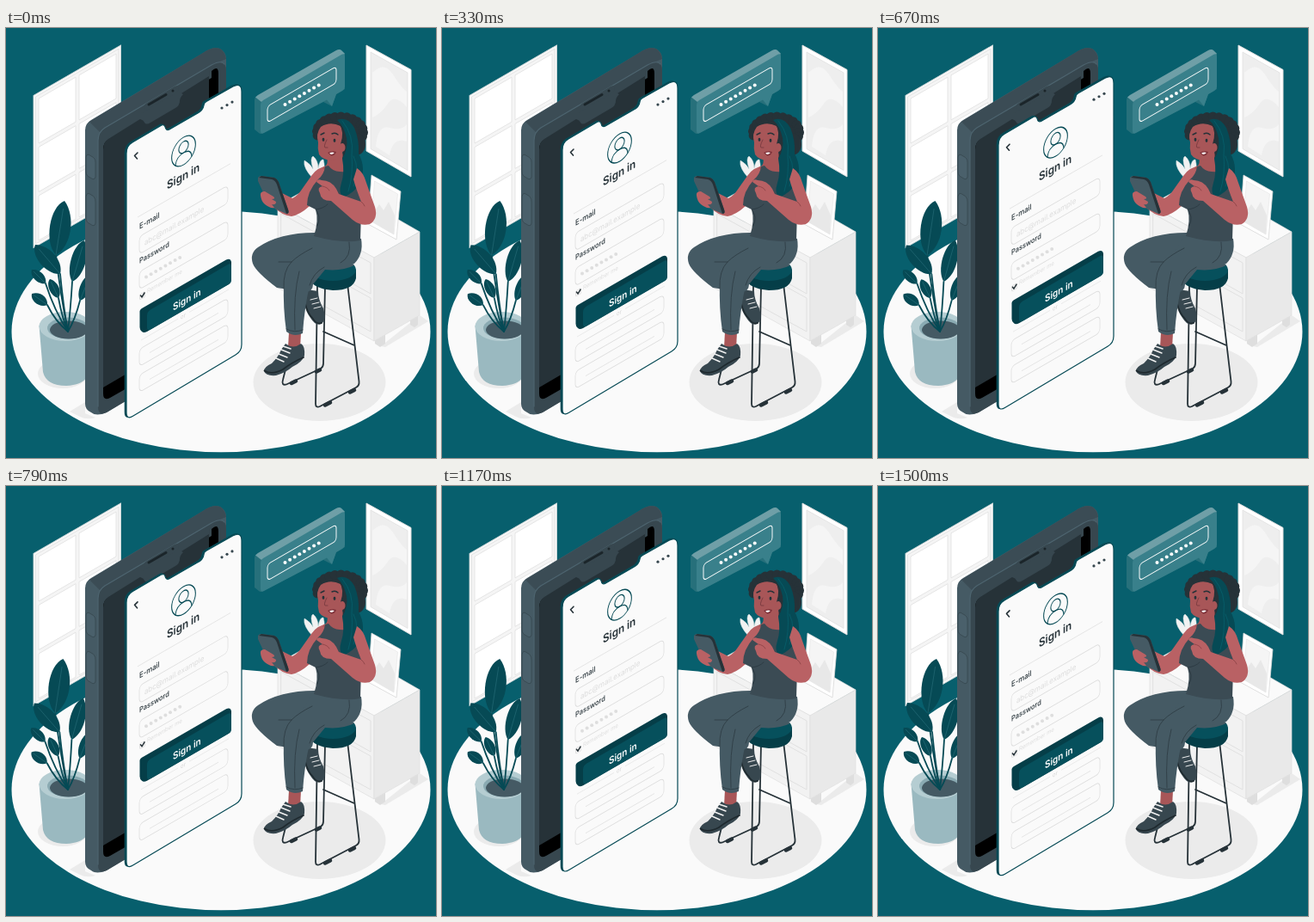
An HTML page that plays this animation: 500 by 500 pixels, repeating every 1.54 s.

```html
<!DOCTYPE html>
<html lang="en">
<head>
<meta charset="utf-8">
<title>Sign in</title>
<style>
html, body { margin: 0; width: 100%; height: 100%; overflow: hidden; background: #075f6d; }
svg { display: block; width: 100vw; height: 100vh; }
text { font-family: Inter, "Liberation Sans", sans-serif; }
.line { fill: none; stroke-linecap: round; stroke-linejoin: round; }
</style>
</head>
<body>
<svg viewBox="0 0 500 500">
  <rect width="500" height="500" fill="#075f6d"/>
  <ellipse cx="250" cy="353" rx="243.500" ry="140.300" fill="#fafafa"/>
  <g fill="#ebebeb">
    <ellipse cx="364.500" cy="412" rx="77" ry="45"/>
    <ellipse cx="66" cy="402" rx="29" ry="17"/>
    <path d="M74 446L92 435V448L104 453Q94 456 86 452Z"/>
    <path d="M436 370L481 334L491 341L441 371Z"/>
  </g>

  <g id="window"></g>

  <g id="wall-art">
    <path d="M419 20L471 48.500V173L419 143Z" fill="#fff" stroke="#dcdcdc"/>
    <path d="M424 28L467 52V165.500L424 140.500Z" fill="#eee" stroke="#e0e0e0" stroke-width=".8"/>
    <path d="M426 52Q440 38 450 54T466 74V92Q452 76 444 88T426 104ZM430 138Q432 112 446 116T466 112V132Q450 126 446 148Z" fill="#f5f5f5"/>
  </g>

  <g id="cabinet" stroke-linejoin="round">
    <path d="M429 352V367L435 371L441 367V350ZM470 336V345L475 348L479 345V333Z" fill="#dedede"/>
    <path d="M316 206L373 175L481 237L428 267Z" fill="#fafafa" stroke="#e0e0e0" stroke-width=".7"/>
    <path d="M316 206L428 267V364L316 302Z" fill="#f2f2f2" stroke="#dedede" stroke-width=".7"/>
    <path d="M428 267L481 237V334L428 364Z" fill="#e9e9e9" stroke="#e0e0e0" stroke-width=".7"/>
    <path class="line" d="M320 216L424 273V309L320 251ZM320 257L424 314V353L320 296Z" stroke="#dcdcdc" stroke-width=".8"/>
    <path d="M425 171L459 190L454 246L421 228Z" fill="#fff" stroke="#d9d9d9" stroke-width=".8"/>
    <path d="M428.500 178L455.500 193L451 240L425 225Z" fill="#f5f5f5" stroke="#e4e4e4" stroke-width=".6"/>
    <path d="M426 217L434 205L439 212L445 202L452 218L451 240L425 225Z" fill="#e8e8e8"/>
    <path d="M358 176Q345 163 347 154Q354 158 357 164Q353 151 357 149Q363 154 363 163Q365 152 369 153Q372 163 368 178Z" fill="#f2f2f2" stroke="#d5e0e1" stroke-width=".5"/>
  </g>

  <g id="pot">
    <path d="M38.500 346L43 400Q47 416 70 416Q88 415 93 407L100 346Z" fill="#9ab9c0"/>
    <ellipse cx="69" cy="347" rx="30.500" ry="17" fill="#b5cdd2"/>
    <ellipse cx="72" cy="349" rx="24" ry="12.500" fill="#8aaab2"/>
    <ellipse cx="73" cy="351" rx="22" ry="10.500" fill="#455a64"/>
  </g>
  <g id="plant"></g>

  <g id="phone">
    <path d="M92 119Q92 111 99 107L229 29Q240 21 249 24Q256 28 256 36V364L117 447Q105 452 99 447Q92 444 92 437Z" fill="#455a64"/>
    <path d="M97 109L229 29Q240 21 249 24Q255 28 256 36L239 43L115 116L109 121Z" fill="#3b4c55"/>
    <path d="M107 131Q107 121 115 116L239 43Q256 34 256 50V364L117 447Q107 452 107 440Z" fill="#37474f"/>
    <path class="line" d="M107 440V131Q107 121 115 116L239 43Q250 37 254 42" stroke="#4d646f" stroke-width="1.200"/>
    <path d="M113 141Q113 133 119 130L239 58V50Q247 43 247 53V358L121 430Q113 434 113 425Z" fill="#000"/>
    <path d="M113 141Q113 133 119 129L236 56V346L113 418Z" fill="#263238"/>
    <path d="M156 106Q160 107 161 110Q163 113 168 110L197 93Q202 90 202 85Q202 81 206 77L200 74L156 100Z" fill="#37474f"/>
    <path d="M160 93Q160 89 164 87L196 68Q201 66 201 70Q201 74 197 76L165 94Q160 97 160 93Z" fill="#37474f"/>
    <path class="line" d="M166 89L186 77.500M194 73v.1" stroke="#1b252a" stroke-width="3"/>
    <g fill="#4a606b" stroke="#37474f" stroke-width=".8">
      <path d="M93 150Q94 145 99 149Q104 151 104 156V173Q103 178 98 174Q93 172 93 167Z"/>
      <path d="M93 196Q94 190 99 194Q104 196 104 202V227Q103 232 98 228Q93 226 93 221Z"/>
    </g>
  </g>

  <g id="sheet">
    <path id="edge" fill="#064a55" stroke="#064a55" stroke-width="1.200" transform="translate(-1.700 -.6)"/>
    <path id="face" fill="#fafafa" stroke="#064a55" stroke-width="1.200"/>
    <path class="line" d="M153 144L149.500 147.500L152.500 151" stroke="#263238" stroke-width="1.600"/>
    <path d="M155.500 330Q155 327 158 325L256 268.500Q261 266 262 271V292Q262 295 259 297L164 352Q160 354 158 352Q155.500 350 155.500 347Z" fill="#053e48"/>
    <path d="M164 333.500Q164 329 168 326.500L258 274Q262 272 262 276V291Q262 295 259 297L169 349Q164 352 164 347Z" fill="#06505c"/>
  </g>

  <g id="bubble">
    <path d="M289 84Q289 80 293 78L384 26Q388 24 390 26L394 29.500V71L384 77L379 91L369 86L299 122Q296 124 294 122L289 118Z" fill="#27707b"/>
    <path d="M290 80.500L293 78L384 26Q388 24 390 26L394 30L297 86Z" fill="#6f9fa7"/>
    <path d="M296 90Q296 86 299 84L390 31Q394 29 394 33V68Q394 71 391 73L384 77L379 91L373 83.500L300 122Q296 124 296 120Z" fill="#39808b"/>
  </g>

  <g id="stool">
    <g class="line" stroke="#263238" stroke-width="1.800">
      <path d="M350 298L322 409Q320 416 326 414.500L366 396Q369 394 369 390L371 301"/>
      <path d="M362 300L360 437Q360 442 365 440L407 418Q411 416 410.500 411L397 297M369 353L405 369"/>
    </g>
    <path class="line" d="M332 413l5-2.500M361 399.500l4-2M371 438.500l6-3M400 423.500l5-2.500" stroke="#263238" stroke-width="4.500"/>
    <path d="M353 281H407V291Q404 305 380 305Q356 303 353 291Z" fill="#053e48"/>
    <ellipse cx="380" cy="281" rx="27" ry="13" fill="#06505c"/>
  </g>

  <g id="woman">
    <g id="back-shoe">
      <path d="M349 304L363 306Q363 316 369 326Q373 339 367 344Q360 347 354 337Q348 329 347 320Z" fill="#37474f"/>
      <path class="line" d="M348 320Q350 331 357 338Q361 345 367 343" stroke="#1e292e" stroke-width="1.500"/>
      <path class="line" d="M354 316l8-2M356 321l8-2M358 326l8-2" stroke="#eee" stroke-width="1"/>
    </g>
    <path d="M329 354H343L342 373L328 371Z" fill="#a85658"/>
    <path d="M325 367Q334 374 343 367Q348 370 347 381Q344 389 333 394Q325 401 314 404Q302 405 300 399Q300 394 309 390Q317 382 320 374Z" fill="#37474f"/>
    <path class="line" d="M300.500 398.500Q309 404 322 397Q332 389 346 383" stroke="#1e292e" stroke-width="1.800"/>
    <path class="line" d="M314 384l9 4M317 379l10 4M320 374l10 4M322 370l9 3" stroke="#f2f2f2" stroke-width="1.500"/>

    <path d="M359 238Q318 238 293 255Q283 262 287 274Q291 284 315 302L347 307Q357 307 357 298L371 281Q391 283 405 276Z" fill="#455a64"/>
    <path d="M358 238L413 245Q416 263 405 274Q391 280 370 278Q357 285 353 299Q347 326 345 355Q335 360 326 353Q322 326 323 296Q325 276 344 262Z" fill="#455a64"/>
    <g class="line" stroke="#2f3e46" stroke-width=".9">
      <path d="M323 303Q322 282 332 272Q340 264 356 256M317 272Q325 272 332 272M326 350Q335 355 345 351M399 249Q402 266 389 273M370 278Q357 285 353 299M341 283Q334 310 336 351"/>
    </g>

    <path d="M377 159Q361 162 355 172L343 189Q339 195 333 198L313 188L305 192Q304 199 311 208Q321 218 332 219Q342 217 353 207L377 185Z" fill="#b96164"/>
    <path d="M293 174Q294 172 297 172L312 174Q315 175 317 179L328 211Q330 216 326 216L310 209Q306 207 304 202L293 178Z" fill="#455a64"/>
    <path d="M297 172L312 174Q315 175 317 179L328 211Q330 216 326 216L315 182Q313 177 309 176L294 174Z" fill="#263238"/>
    <path d="M296 195Q295 190 301 190L311 196Q314 199 309 199L314 202Q314 206 309 205L312 209Q307 210 301 205Q297 202 296 195Z" fill="#b96164"/>

    <path d="M372 146H398L403 166Q398 174 384 173L368 163Q377 159 372 146Z" fill="#a85658"/>
    <path d="M375 160Q380 167 388 167Q398 168 403 163Q412 166 414 178L412 247Q391 251 358 242Q364 224 360 211L350 206Q350 190 363 176Q370 170 371 161Z" fill="#3b4b54"/>
    <path class="line" d="M360 211Q369 210 374 205M362 230Q367 220 361 212" stroke="#2c3a42" stroke-width=".9"/>

    <g id="hair" fill="#263238"></g>
    <path d="M366 115Q377 108 389 114Q397 125 393 142Q389 154 378 154Q368 153 364 147Q362 140 363 133Q360 123 366 115Z" fill="#a85658"/>
    <path d="M387 111Q394 120 389 135Q393 147 391 152Q402 153 403 138Q403 120 387 111Z" fill="#263238"/>
    <path d="M385 107Q397 102 405 116Q411 130 410 146Q419 163 412 180Q406 191 392 197Q386 192 390 180Q394 168 391 152Q398 140 396 128Q393 114 385 107Z" fill="#064a55"/>
    <path class="line" d="M391 108Q405 125 402 148Q404 170 398 190M404 149Q412 165 404 184" stroke="#07606d" stroke-width=".8"/>
    <ellipse cx="391" cy="139" rx="3.500" ry="5" fill="#a85658"/>
    <g class="line" stroke="#263238">
      <path d="M366 124l4-2M379 123q4-2 7 1" stroke-width="1.400"/>
      <path d="M373 130Q369 138 371 139L374 139" stroke="#793c40" stroke-width=".9"/>
      <path d="M369 129v1.500M382 130v1.500" stroke-width="2.600"/>
    </g>
    <path d="M374 145Q379 142 384 144Q382 149 378 148.500Z" fill="#7d3038"/>
    <path d="M376 145.500Q379 144 382 145Q380 147 378 147Z" fill="#fff"/>

    <path d="M408 163Q416 168 419 180L429 208Q433 222 423 228Q413 231 403 223L378 201Q366 201 365 192Q361 185 368 184L361 179Q362 175 367 177Q378 177 384 187L387 193L413 202Q407 187 404 176Z" fill="#b96164"/>
    <path class="line" d="M368 184Q374 185 376 189M413 202Q416 204 417 207" stroke="#8f4549" stroke-width=".9"/>
  </g>
</svg>
<script>
const LOOP = 1540, LIFT = 10.2;
const $ = id => document.getElementById(id);

function add(parent, tag, attrs, text) {
  const el = document.createElementNS("http://www.w3.org/2000/svg", tag);
  for (const k in attrs) el.setAttribute(k, attrs[k]);
  if (text) el.textContent = text;
  return parent.appendChild(el);
}

// Isometric plane rising to the right, with its origin at x, y
const iso = (x, y) => `matrix(.866 -.5 0 1 ${x} ${y})`;

function label(x, y, size, fill, text, weight = 400) {
  add(sheet, "text", { transform: iso(x, y), "font-size": size, "font-weight": weight, fill }, text);
}
function box(parent, x, y, w, h, r, stroke, width = .9, fill = "none") {
  add(parent, "rect", { transform: iso(x, y), width: w / .866, height: h, rx: r, fill, stroke, "stroke-width": width });
}
function dots(parent, n, x, y, step, r, fill) {
  for (let i = 0; i < n; i++)
    add(parent, "circle", { cx: x + i * step, cy: y - i * step * .577, r, fill });
}
function rule(x1, y, x2, stroke = "#e0e0e0") {
  add(sheet, "path", { d: `M${x1} ${y}L${x2} ${y - (x2 - x1) * .577}`, stroke, "stroke-width": .8 });
}

// Window
const win = $("window");
box(win, 32, 78.500, 101.500, 177, 0, "#d5dcdd", 1, "#f9f9f9");
box(win, 34.500, 80, 96.500, 171, 0, "#dedede", .7, "#f5f5f5");
for (const x of [38, 85])
  for (let row = 0; row < 3; row++)
    box(win, x, 82 - (x - 38) * .577 + row * 56.500, 43, 52, 0, "#e2e2e2", .8, "#fff");

// Plant: base and tip of each leaf, half width
const plant = $("plant"), root = [72, 353];
function leaf(bx, by, tx, ty, w) {
  const dx = tx - bx, dy = ty - by, len = Math.hypot(dx, dy);
  const nx = -dy / len * w * 1.350, ny = dx / len * w * 1.350;
  const at = (k, s) => `${bx + dx * k + nx * s} ${by + dy * k + ny * s}`;
  add(plant, "path", { class: "line", stroke: "#064a55", "stroke-width": 1.800,
    d: `M${root}Q${(bx + root[0]) / 2 + (bx - root[0]) * .1} ${(by + root[1]) / 2 + 4} ${bx} ${by}` });
  add(plant, "path", { fill: "#064a55",
    d: `M${bx} ${by}C${at(.2, 1)} ${at(.75, 1)} ${tx} ${ty}C${at(.85, -1)} ${at(.2, -1)} ${bx} ${by}` });
  add(plant, "path", { class: "line", stroke: "#2b717c", "stroke-width": .6, d: `M${bx} ${by}L${at(.85, 0)}` });
}
leaf(58, 264, 68, 201, 12);
leaf(63, 286, 34, 252, 9.500);
leaf(77, 295, 91, 247, 8.500);
leaf(46, 297, 30, 281, 5.500);
leaf(48, 322, 30, 309, 6);
leaf(61, 314, 51, 292, 5.500);
leaf(86, 317, 98, 287, 6);

// Floating sign-in sheet
const sheet = $("sheet");
const outline = "M140 145Q140 136 147 132L181 112Q184 111 185 114Q186 119 190 117L223 98Q229 95 230 89Q230 86 233 84.500L264 67Q274 62 274 73V367Q274 375 267 379L148 450Q140 455 140 446Z";
$("edge").setAttribute("d", outline);
$("face").setAttribute("d", outline);

dots(sheet, 3, 251, 92, 6, 1.600, "#37474f");
const user = add(sheet, "g", { transform: iso(206.500, 142), class: "line", stroke: "#064a55", "stroke-width": 1.200 });
add(user, "circle", { r: 16 });
add(user, "circle", { cy: -4.500, r: 6.500 });
add(user, "path", { d: "M-11 11.500Q-10 2 0 2T11 11.500" });

label(187, 187, 13.500, "#263238", "Sign in", 600);
rule(153, 219, 261);
label(155, 233, 9, "#263238", "E-mail", 500);
label(155, 273, 8.600, "#263238", "Password", 500);
for (const y of [241.500, 282.500, 372.500, 402.500])
  box(sheet, 155, y, 103, y > 300 ? 20 : 20.500, 5, "#dedede");
label(161, 252, 9, "#dcdcdc", "abc@mail.example");
dots(sheet, 8, 163, 288.500, 5.600, 2, "#dedede");
box(sheet, 155.500, 309, 6, 6, 1, "#d5d5d5", .7);
add(sheet, "path", { class: "line", d: "M156.500 310L158 312L161 307", stroke: "#263238", "stroke-width": 1.500 });
label(164, 307.500, 6.900, "#dedede", "Remember me");
label(194, 328, 11.500, "#fff", "Sign in", 600);
rule(157, 362, 200, "#e6e6e6");
label(203, 338, 7, "#d5d5d5", "or");
rule(213, 329.500, 259, "#e6e6e6");
rule(167, 376.500, 247);
rule(167, 407.500, 247);

// Password bubble
const bubble = $("bubble");
box(bubble, 304, 91, 80, 19, 4, "#fff", 1.100);
dots(bubble, 8, 324.500, 89, 5.600, 2, "#fff");

// Curly hair: a ring of round tufts
const hair = $("hair");
add(hair, "ellipse", { cx: 388, cy: 122, rx: 27, ry: 20 });
for (let i = 0; i < 17; i++) {
  const a = Math.PI * (.93 + i * .083);
  add(hair, "circle", { cx: 388.500 + 27 * Math.cos(a), cy: 121 + 18 * Math.sin(a), r: 5.500 });
}
add(hair, "ellipse", { cx: 407, cy: 135, rx: 11, ry: 13 });

function draw(ms) {
  const k = (1 - Math.cos(2 * Math.PI * (ms % LOOP) / LOOP)) / 2;
  sheet.setAttribute("transform", `translate(0 ${1 - LIFT * k})`);
  plant.setAttribute("transform", `rotate(${-.6 * k} ${root})`);
}

let start;
function tick(now) {
  start ??= now;
  draw(now - start);
  requestAnimationFrame(tick);
}
draw(0);
requestAnimationFrame(tick);
</script>
</body>
</html>
```
